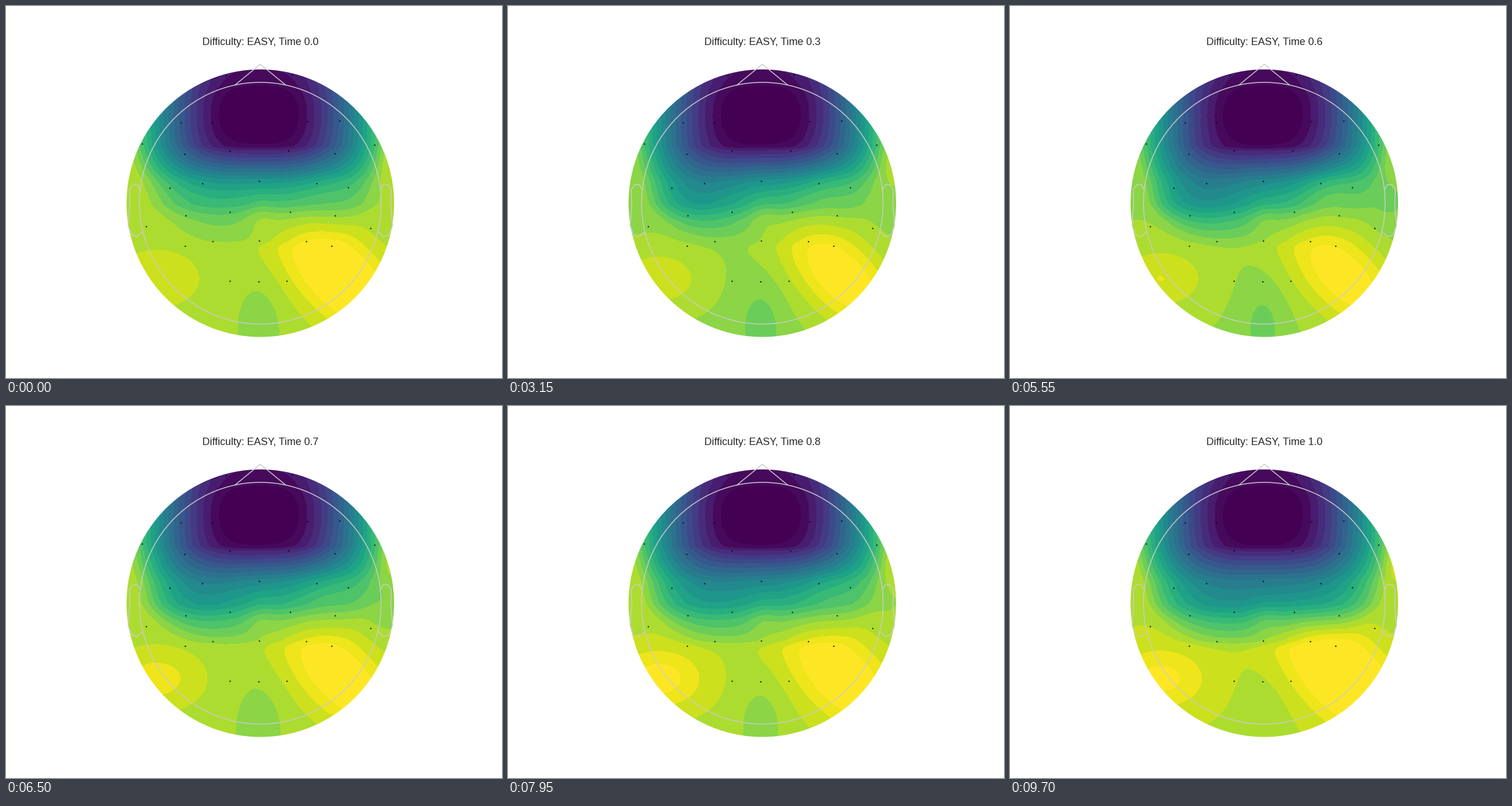
These frames come from a looping animation (864 px wide and 648 px high, 10000 ms). A matplotlib script:

```python
import numpy as np
import matplotlib.pyplot as plt
from matplotlib.animation import FuncAnimation
from matplotlib.patches import Circle

W, H = 864, 648
STEP, LOOP = 50, 10000
CX, CY, R_MAP, R_HEAD = 443, 343.5, 233, 210.5
BANDS = 20
LINE = dict(color="#cccccc", lw=1.5, solid_joinstyle="round")

# Runs of picture changes (ms): first, last, count.
RUNS = [(350, 1350, 10), (1400, 1700, 3), (1750, 1750, 1), (2100, 3100, 10),
        (3150, 3350, 2), (3450, 3500, 2), (3800, 4450, 7), (4500, 4800, 3),
        (4850, 5700, 9), (5900, 6500, 6), (6550, 6900, 4), (6950, 7950, 10),
        (8300, 9250, 10), (9350, 9700, 5)]

SENSORS = [
    (382.5, 121), (498, 119.5), (304.5, 203), (358.5, 203), (524.5, 201),
    (581, 199.5), (236.5, 240), (641.5, 241.5), (311, 258), (390, 252),
    (492, 252), (572.5, 257), (284.5, 316.5), (342, 308.5), (441, 304.5),
    (540.5, 308.5), (595.5, 316), (313, 365), (389.5, 359), (494.5, 359),
    (572.5, 365), (244, 383.5), (634.5, 386.5), (312, 417.5), (360, 410),
    (440.5, 408.5), (523, 410), (567, 417.5), (390, 479), (439.5, 479.5),
    (489, 478.5)]

side = np.arange(2 * R_MAP + 1) - R_MAP
GX, GY = np.meshgrid(CX + side, CY + side)


def bump(x, y, sx, sy, tilt=0):
    """Gaussian hill; tilt turns its long axis clockwise, in degrees."""
    c, s = np.cos(np.deg2rad(tilt)), np.sin(np.deg2rad(tilt))
    dx, dy = GX - x, GY - y
    along, across = dx * c + dy * s, dy * c - dx * s
    return np.exp(-0.5 * ((along / sx) ** 2 + (across / sy) ** 2))


def front_basin():
    """Rounded trough around the forehead, in colour bands."""
    dx, dy = np.abs(GX - 440) / 100, GY - 190
    across = 2.2 * dx + 3.05 * dx ** 2
    down = np.interp(dy, [-80, -52, 0, 54, 62, 85, 114, 155, 185, 219, 260],
                     [4, 3, 0, 3, 4.8, 7.6, 10.9, 13, 16.4, 19.2, 26])
    return (across ** 2.2 + down ** 2.2) ** (1 / 2.2) - 3


# Strength of each part at these moments (ms), linear in between.
MOMENTS = [0, 1550, 3150, 4450, 6500, 7950, 9700]
PLATEAU = [17.5, 17.1, 16.8, 16.5, 17.4, 17.7, 17.9]
SLOPE_PARTS = [
    (bump(443, 340, 80, 40), [3, 4, 2.8, 1.9, 1.8, 1.5, 0]),
    (bump(310, 335, 65, 45), [1.8, 0.7, -1.2, -2.2, -0.8, -0.2, 0]),
    (bump(555, 325, 42, 38), [2.2, 3.6, 2.8, 4.6, 2.4, 2.2, 0.2]),
]
BACK_PARTS = [
    (bump(262, 475, 56, 38), [1.2, 1.6, 2, 2, 2.1, 2.9, 2.5]),
    (bump(440, 560, 28, 55), [-1.2, -1.4, -1.3, -1.5, -1.1, -1.3, -0.7]),
    (bump(580, 470, 95, 46, 45), [4.7, 4, 4.4, 4.2, 3.9, 3.8, 5]),
    (bump(660, 325, 35, 45), [-0.5, 0, -0.3, -1.3, -1.5, -1, -0.6]),
]
BASIN = front_basin() + 0.9 * bump(443, 368, 18, 22)
RIM_STRIPE = 0.9 * bump(672, 275, 14, 35)


def field_at(ms):
    def level(keys):
        return np.interp(ms, MOMENTS, keys)

    slope = BASIN + sum(level(k) * shape for shape, k in SLOPE_PARTS)
    soft = 0.7
    capped = -soft * np.logaddexp(-slope / soft, -level(PLATEAU) / soft)
    return capped + RIM_STRIPE + sum(level(k) * shape for shape, k in BACK_PARTS)


def paint(field):
    band = np.clip(np.floor(field).astype(int) + 1, 0, BANDS + 1)
    return PALETTE[band]


def draw_head(ax):
    ax.add_patch(Circle((CX, CY), R_HEAD, fill=False, ec=LINE["color"], lw=LINE["lw"]))
    tilt = np.deg2rad(12)
    nose_x = np.array([-tilt, 0, tilt])
    nose_y = np.array([np.cos(tilt), 1.15, np.cos(tilt)])
    ax.plot(CX + R_HEAD * nose_x, CY - R_HEAD * nose_y, **LINE)
    ear_x = np.array([.497, .510, .518, .5299, .5419, .54, .547, .532, .510, .489])
    ear_y = np.array([.0555, .0775, .0783, .0746, .0555,
                      -.0055, -.0932, -.1313, -.1384, -.1199])
    for sign in (-1, 1):
        ax.plot(CX + sign * 2 * R_HEAD * ear_x, CY - 2 * R_HEAD * ear_y, **LINE)


shades = np.r_[0, (np.arange(BANDS) + 0.5) / BANDS, 1.0]
PALETTE = plt.get_cmap("viridis")(shades, bytes=True)[:, :3]
CHANGES = np.concatenate(
    [[0]] + [np.round(np.linspace(a, b, n) / STEP) * STEP for a, b, n in RUNS])

# At 72 dpi one point is one pixel.
fig = plt.figure(figsize=(W / 72, H / 72), dpi=72, facecolor="white")
ax = fig.add_axes([0, 0, 1, 1])
ax.axis("off")

left, top = CX - R_MAP, CY - R_MAP - 0.5
size = 2 * R_MAP + 1
scalp = ax.imshow(paint(field_at(0)), extent=(left, left + size, top + size, top),
                  interpolation="nearest", aspect="auto")
scalp.set_clip_path(Circle((CX, CY), R_MAP, transform=ax.transData))
draw_head(ax)
ax.plot(*zip(*SENSORS), "o", color="black", ms=2.3, mew=0, zorder=4)
title = ax.text(CX, 68, "", family="Liberation Sans", size=18, color="#262626",
                ha="center", va="baseline")
ax.set_xlim(0, W)
ax.set_ylim(H, 0)


def update(frame):
    ms = CHANGES[np.searchsorted(CHANGES, frame * STEP, side="right") - 1]
    scalp.set_data(paint(field_at(ms)))
    title.set_text(f"Difficulty: EASY, Time {ms / LOOP:.1f}")
    return scalp, title


anim = FuncAnimation(fig, update, frames=LOOP // STEP, interval=STEP,
                     repeat=True, repeat_delay=0, blit=False)
plt.show()
```
